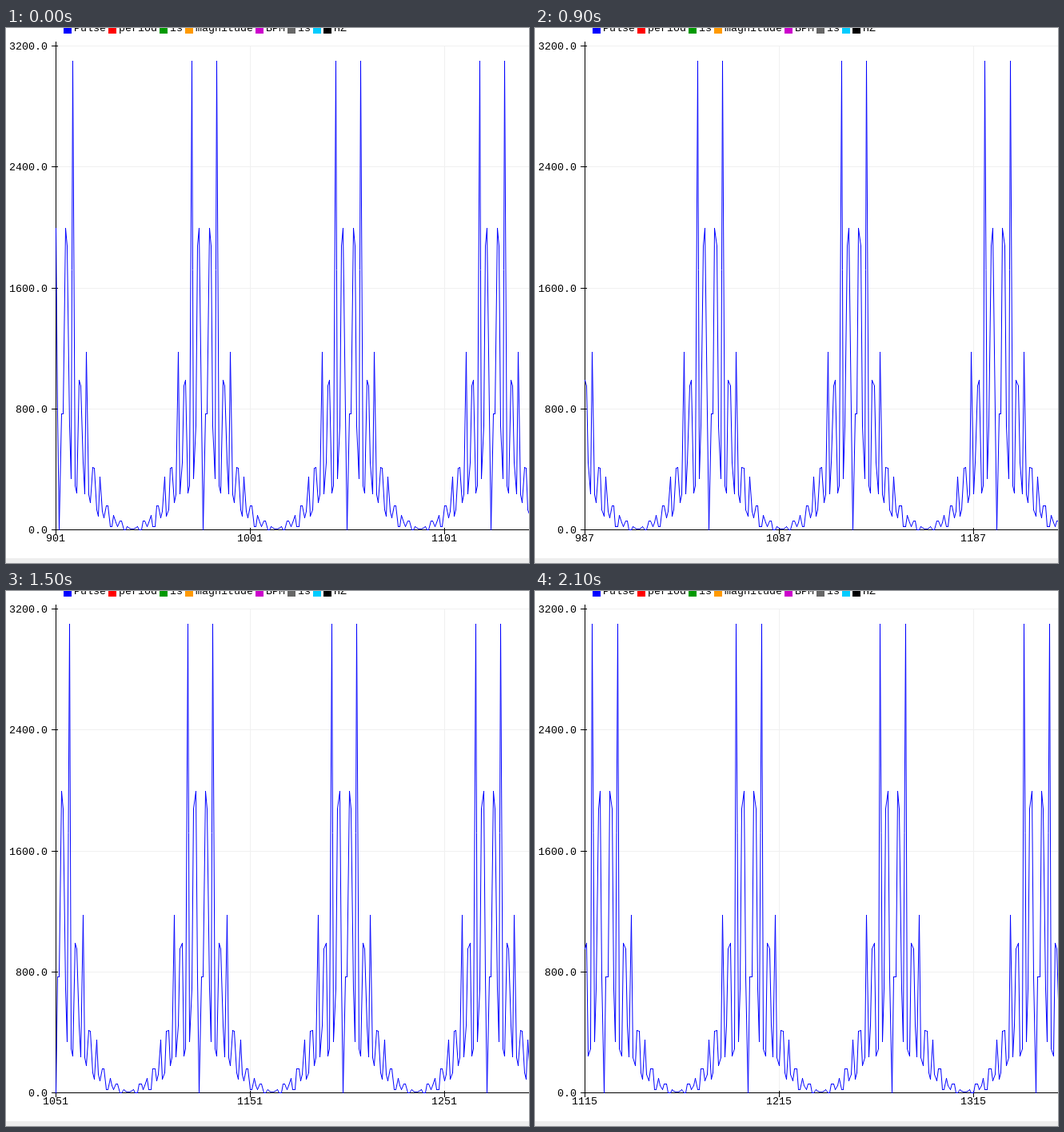
Write an HTML page with a canvas that moves like this. It is 654 px wide and 669 px high and loops after 2.2 s.

```html
<!DOCTYPE html>
<html lang="en">
<head>
<meta charset="utf-8">
<title>Serial plot</title>
<style>
  html, body { margin: 0; width: 100%; height: 100%; overflow: hidden; background: #fff; }
  svg, canvas { position: absolute; left: 0; top: 0; display: block; }
  text { font: 10pt "Liberation Mono", monospace; fill: #000; }
</style>
</head>
<body>
<svg id="chart" width="654" height="669" shape-rendering="crispEdges"></svg>
<canvas id="curve" width="654" height="669"></canvas>
<script>
const WIDTH = 654, HEIGHT = 669;
const LEFT = 62, TOP = 22, BASE = 627;
const MAX_VALUE = 3200;
const STEP = 608 / 250; // pixels per sample
const LOOP = 2200;

// First visible sample after each refresh of the plot.
const FIRST_SAMPLES = [901, 921, 941, 963, 987, 1009, 1029, 1051, 1071, 1091, 1115];

const LEGEND = [
  ["Pulse", "#0000ff"], ["period", "#ff0000"], ["is", "#009900"],
  ["magnitude", "#ff9900"], ["BPM", "#cc00cc"], ["is", "#666666"],
  ["", "#00ccff"], ["HZ", "#000000"]
];

// The spectrum repeats a group of seven bins that fades from group to group.
const fading = bend => (size, rate) => group => size * Math.exp(-rate * group ** bend);
const peak = fading(1.17), dip = fading(1.9);
const GROUP = [
  peak(1995, 0.7), peak(1880, 0.68), dip(690, 0.44), dip(340, 0.35),
  peak(3100, 0.97), dip(290, 0.23), dip(243, 0.3)
];
const PERIOD = 74, PHASE = 903, LEAD = 3, LEAD_VALUE = 768;

const svg = document.getElementById("chart");
const ctx = document.getElementById("curve").getContext("2d");

function add(tag, attrs, content = "") {
  const node = document.createElementNS(svg.namespaceURI, tag);
  for (const key in attrs) node.setAttribute(key, attrs[key]);
  node.textContent = content;
  svg.append(node);
  return node;
}
const rect = (x, y, width, height, fill) => add("rect", { x, y, width, height, fill });
const label = (x, y, anchor, content) => add("text", { x, y, "text-anchor": anchor }, content);

const toX = offset => Math.floor(LEFT + offset * STEP);
const toY = value => Math.round(BASE - value / MAX_VALUE * (BASE - TOP));

function drawLegend() {
  let x = 72;
  for (const [name, color] of LEGEND) {
    rect(x, -3, 10, 10, color);
    x += 13;
    if (name) {
      label(x, 4, "start", name);
      x += name.length * 8 + 3;
    }
  }
}

function drawAxes() {
  for (let value = 0; value <= MAX_VALUE; value += 800) {
    const y = toY(value);
    if (value) rect(LEFT + 3, y, WIDTH - LEFT - 3, 1, "#f0f0f0");
    rect(LEFT - 5, y, 8, 1, "#000");
    label(52, y + 5, "end", value.toFixed(1));
  }
  rect(LEFT, TOP - 5, 1, BASE - TOP + 11, "#000");
  rect(LEFT - 5, BASE, WIDTH - LEFT + 5, 1, "#000");
  return [0, 100, 200].map(offset => {
    const x = toX(offset);
    if (offset) {
      rect(x, TOP, 1, BASE - TOP - 2, "#f0f0f0");
      rect(x, BASE - 2, 1, 8, "#000");
    }
    return { offset, node: label(x, 642, "middle", "") };
  });
}

function magnitude(sample) {
  const bin = ((sample - PHASE) % PERIOD + PERIOD) % PERIOD;
  if (bin === 0) return 0;
  const k = Math.min(bin, PERIOD + 1 - bin); // mirrored halves
  if (k < LEAD) return LEAD_VALUE;
  const i = k - LEAD;
  return GROUP[i % GROUP.length](Math.floor(i / GROUP.length));
}

function drawCurve(first) {
  ctx.clearRect(0, 0, WIDTH, HEIGHT);
  ctx.strokeStyle = "#0000ff";
  ctx.lineCap = "square";
  const point = i => [toX(i) + 0.5, toY(magnitude(first + i)) + 0.5];
  for (let i = 0; toX(i) < WIDTH; i++) {
    ctx.beginPath();
    ctx.moveTo(...point(i));
    ctx.lineTo(...point(i + 1));
    ctx.stroke();
  }
}

// Refreshes come every 200 ms, apart from one late and one quick one.
function refreshAt(time) {
  if (time < 600) return time < 200 ? 0 : 1;
  return time < 700 ? 2 : 3 + Math.floor((time - 700) / 200);
}

rect(0, 663, WIDTH, 6, "#eeeeee");
drawLegend();
const xLabels = drawAxes();

let shown = null;
function render() {
  const first = FIRST_SAMPLES[refreshAt(performance.now() % LOOP)];
  if (first !== shown) {
    shown = first;
    drawCurve(first);
    for (const { offset, node } of xLabels) node.textContent = first + offset;
  }
  requestAnimationFrame(render);
}
render();
</script>
</body>
</html>
```
